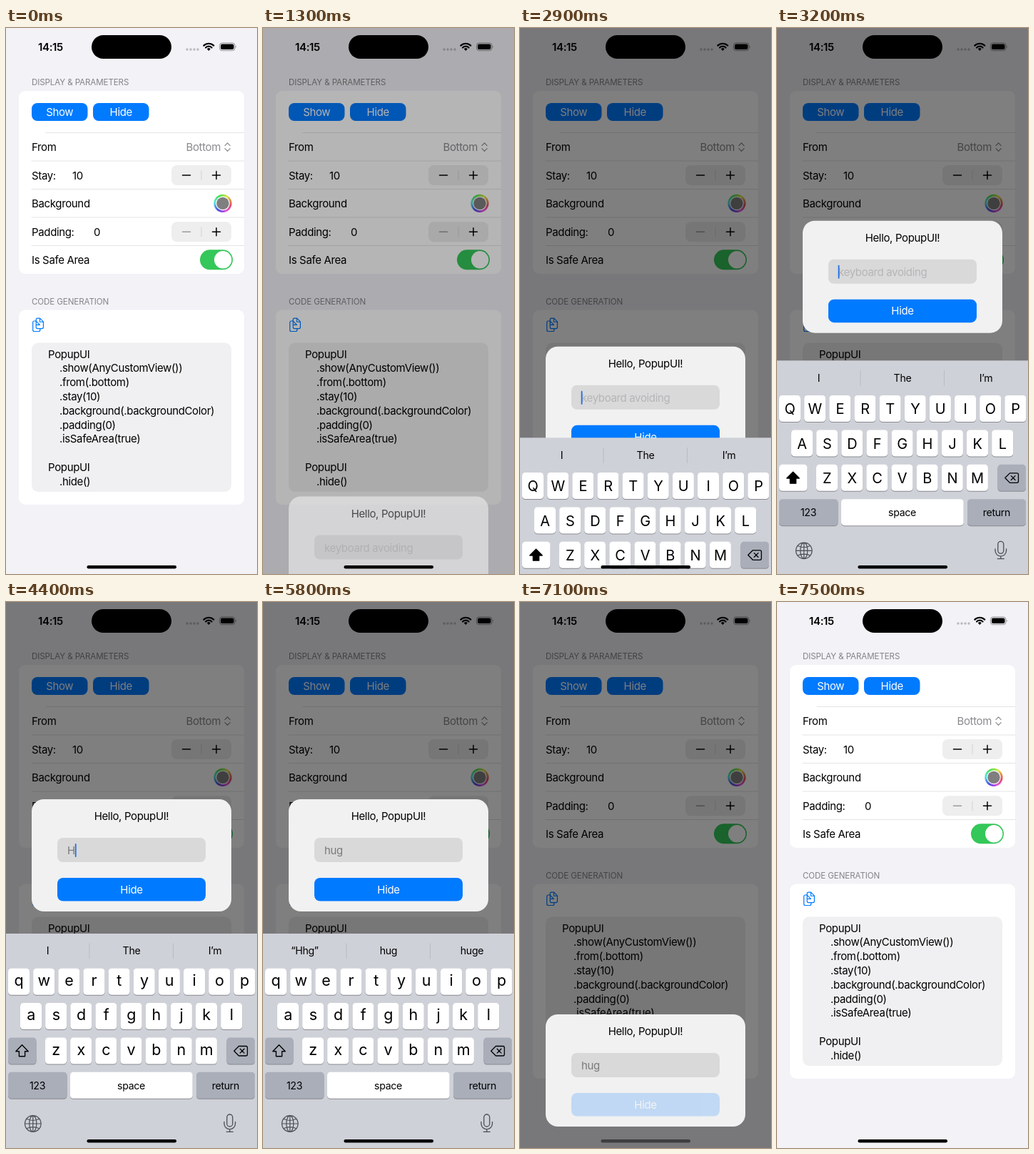
Write an HTML page that moves like this. It is 352 px wide and 764 px high and loops after 7.9 s.

```html
<!DOCTYPE html>
<html lang="en">
<head>
<meta charset="utf-8">
<title>Popup demo</title>
<style>
html, body { margin: 0; width: 100%; height: 100%; overflow: hidden; background: #f2f2f7; }
svg { display: block; width: 352px; height: 764px; }
text { font-family: Inter, "Liberation Sans", sans-serif; letter-spacing: -.35px; white-space: pre; }
.caps { letter-spacing: -.12px; }
.line { fill: none; stroke-linecap: round; stroke-linejoin: round; }
</style>
</head>
<body>
<svg id="stage" viewBox="0 0 352 764" xmlns="http://www.w3.org/2000/svg">
  <g id="page"></g>
  <rect id="dim" width="352" height="764"/>
  <g id="popup"></g>
  <g id="keyboard"></g>
  <rect id="home" x="113.5" y="752" width="125.5" height="4.5" rx="2.25"/>
</svg>
<script>
const LOOP = 7900, STEP = 100;
const BLUE = '#007aff', GRAY = '#8a8a8e';
const $ = id => document.getElementById(id);

function add(parent, tag, attrs, content) {
  const el = document.createElementNS('http://www.w3.org/2000/svg', tag);
  for (const key in attrs) el.setAttribute(key, attrs[key]);
  if (content !== undefined) el.textContent = content;
  parent.appendChild(el);
  return el;
}
const box = (p, x, y, width, height, rx, fill) =>
  add(p, 'rect', { x, y, width, height, rx, fill });
const disc = (p, cx, cy, r, fill) => add(p, 'circle', { cx, cy, r, fill });
const line = (p, d, stroke, width) =>
  add(p, 'path', { d, stroke, 'stroke-width': width, class: 'line' });
// Text whose capitals are vertically centred on y.
const label = (p, str, x, y, { fill = '#000', size = 15, anchor = 'start', ...rest } = {}) =>
  add(p, 'text', { x, y: y + size * .364, fill, 'font-size': size, 'text-anchor': anchor, ...rest }, str);
const centred = (p, str, x, y, opts) => label(p, str, x, y, { anchor: 'middle', ...opts });

function button(p, str, x, y, w, h) {
  const g = add(p, 'g', {});
  box(g, x, y, w, h, 8, BLUE);
  centred(g, str, x + w / 2, y + h / 2, { fill: '#fff' });
  return g;
}

function statusBar(p) {
  label(p, '14:15', 45, 26.5, { 'font-weight': 600 });
  box(p, 120, 10, 112, 33, 16.5, '#000');
  for (let i = 0; i < 4; i++) disc(p, 254 + i * 5, 30, 1.7, '#b9b9be');
  line(p, 'M277.3 24.6A10 10 0 0 1 291.3 24.6', '#000', 2.2);
  line(p, 'M280 27.4A6.2 6.2 0 0 1 288.6 27.4', '#000', 2.1);
  add(p, 'path', { d: 'M281.8 29.3A3.6 3.6 0 0 1 286.8 29.3L284.3 32Z' });
  add(p, 'rect', { x: 299.5, y: 21, width: 21.5, height: 10.6, rx: 3.4, fill: 'none', stroke: '#8d8d91' });
  box(p, 301, 22.5, 18.5, 7.6, 2.1, '#000');
  add(p, 'path', { d: 'M322 24.5Q323.8 26.3 322 28.1Z', fill: '#8d8d91' });
}

function stepper(p, y, minus) {
  box(p, 232, y - 14, 84, 28, 7.5, '#eeeeef');
  line(p, `M247.5 ${y}h11`, minus, 1.5);
  line(p, `M274 ${y - 6.5}v13`, '#d3d3d6', 1);
  line(p, `M289.5 ${y}h11M295 ${y - 5.5}v11`, '#000', 1.5);
}

function colorWell(p, cx, cy) {
  const segments = 36, r = 11.2;
  const at = a => `${cx + r * Math.sin(a)} ${cy - r * Math.cos(a)}`;
  for (let i = 0; i < segments; i++) {
    const a = i / segments * 2 * Math.PI;
    add(p, 'path', {
      d: `M${at(a)}A${r} ${r} 0 0 1 ${at(a + .19)}`, fill: 'none',
      stroke: `hsl(${90 - i * 360 / segments} 72% 58%)`, 'stroke-width': 2.8
    });
  }
  disc(p, cx, cy, 8.7, '#7f7f7f');
}

function buildPage(p) {
  box(p, 0, 0, 352, 764, 0, '#f2f2f7');
  statusBar(p);

  const caps = { fill: '#858589', size: 11.6, class: 'caps' };
  label(p, 'DISPLAY & PARAMETERS', 36, 75.3, caps);
  box(p, 18, 88, 316, 256, 9, '#fff');
  button(p, 'Show', 36, 105, 78.5, 25);
  button(p, 'Hide', 122, 105, 78.5, 25);
  line(p, 'M56 146.5H334', '#dddde0', .8);
  for (let i = 1; i < 5; i++) line(p, `M36 ${146.5 + i * 39.5}H334`, '#dddde0', .8);

  label(p, 'From', 36, 167);
  label(p, 'Bottom', 301, 167, { fill: GRAY, anchor: 'end' });
  line(p, 'M307 164.6l3.6-3.8 3.6 3.8M307 168.6l3.6 3.8 3.6-3.8', GRAY, 1.2);
  label(p, 'Stay:', 36, 206.3);
  label(p, '10', 93, 206.3);
  stepper(p, 206, '#000');
  label(p, 'Background', 36, 245.8);
  colorWell(p, 304, 245.4);
  label(p, 'Padding:', 36, 285.3);
  label(p, '0', 123, 285.3);
  stepper(p, 285.3, '#9b9ba0');
  label(p, 'Is Safe Area', 36, 324.8);
  box(p, 272, 310.3, 46, 28, 14, '#34c759');
  disc(p, 304.2, 324.3, 12.2, '#fff');

  label(p, 'CODE GENERATION', 36, 382.3, caps);
  box(p, 18, 394.5, 316, 272.5, 9, '#fff');
  line(p, 'M42 410H39.5Q37.7 410 37.7 412V422.5Q37.7 424.5 39.5 424.5H46Q47.8 424.5 47.8 422.5V420.8', BLUE, 1.2);
  line(p, 'M42.2 408.2Q42.2 406.2 44 406.2H47.6L52.4 411.2V418.6Q52.4 420.6 50.6 420.6H44Q42.2 420.6 42.2 418.6Z', BLUE, 1.2);
  line(p, 'M47.4 406.5V411.3H52.2M42 410L47.5 415.4H42.6', BLUE, 1.1);
  box(p, 36, 440.5, 280, 208.5, 9, '#f0f0f2');
  ['PopupUI', '.show(AnyCustomView())', '.from(.bottom)', '.stay(10)',
    '.background(.backgroundColor)', '.padding(0)', '.isSafeArea(true)', '',
    'PopupUI', '.hide()'
  ].forEach((code, i) => label(p, code, code[0] === '.' ? 75 : 59, 456.2 + i * 19.8));
}

function buildPopup(p) {
  box(p, 36, 0, 280, 157, 17, '#f1f1f2');
  centred(p, 'Hello, PopupUI!', 176, 24);
  box(p, 72, 54, 208, 34, 7.5, '#d9d9da');
  return {
    field: label(p, '', 86, 71.7),
    caret: box(p, 85.7, 62, 1.8, 19, .9, '#1f6fe5'),
    hide: button(p, 'Hide', 72, 110, 208, 32.5)
  };
}

function key(p, x, y, w, fill = '#fff') {
  box(p, x, y + 1, w, 37, 4.5, '#898b90');
  return box(p, x, y, w, 37, 4.5, fill);
}

function buildKeyboard(p) {
  const dark = '#a9aeb9', ink = '#4c4e55';
  box(p, 0, 464, 352, 300, 0, '#cfd1d8');
  line(p, 'M117 478V499M234.5 478V499', '#b7b9c0', .9);
  const words = [58.5, 176, 293].map(x => centred(p, '', x, 488.3, { size: 14.2 }));
  const letters = [];
  [['QWERTYUIOP', 3], ['ASDFGHJKL', 20], ['ZXCVBNM', 55]].forEach(([row, x0], r) => {
    [...row].forEach((char, i) => {
      const x = x0 + i * 35.15, y = 512.7 + r * 48.4;
      key(p, x, y, 30);
      const el = centred(p, char, x + 15, y + 19, { size: 20, 'letter-spacing': 0 });
      letters.push({ el, char, y: y + 26.3 });
    });
  });
  const shiftKey = key(p, 3, 609.5, 39.5);
  const arrow = line(p, 'M22.5 619.8L31.2 628.7H26.6V635.8H18.4V628.7H13.8Z', '#000', 1.4);
  key(p, 309.5, 609.5, 39.5, dark);
  line(p, 'M326.5 621.5H336.5Q338.5 621.5 338.5 623.5V633Q338.5 635 336.5 635H326.5L319.8 628.2ZM328.3 625.3l5.8 5.8M334.1 625.3l-5.8 5.8', '#000', 1.3);
  key(p, 3, 657.8, 82.5, dark);
  key(p, 90, 657.8, 171.7);
  key(p, 267, 657.8, 82, dark);
  [['123', 44], ['space', 175.5], ['return', 308]].forEach(([s, x]) =>
    centred(p, s, x, 676.8, { size: 14.2 }));
  line(p, 'M26.5 730a11.3 11.3 0 1 0 22.6 0a11.3 11.3 0 1 0-22.6 0M32.8 730a5 11.3 0 1 0 10 0a5 11.3 0 1 0-10 0M37.8 718.7V741.3M26.5 730H49.1M29 723.2Q37.8 727.4 46.6 723.2M29 736.8Q37.8 732.6 46.6 736.8', ink, 1.2);
  line(p, 'M309.8 721a4 4 0 0 1 8 0V730a4 4 0 0 1-8 0ZM306 727.5V730a7.8 7.8 0 0 0 15.6 0V727.5M313.8 738V741.3M309.3 741.3H318.3', ink, 1.3);

  return (upper, suggestions) => {
    words.forEach((el, i) => { el.textContent = suggestions[i]; });
    for (const { el, char, y } of letters) {
      el.textContent = upper ? char : char.toLowerCase();
      el.setAttribute('font-size', upper ? 20 : 21.5);
      el.setAttribute('y', upper ? y : y - 2);
    }
    shiftKey.setAttribute('fill', upper ? '#fff' : dark);
    arrow.style.fill = upper ? '#000' : 'none';
  };
}

buildPage($('page'));
const popup = buildPopup($('popup'));
const setKeys = buildKeyboard($('keyboard'));

const clamp = v => Math.min(1, Math.max(0, v));
// Damped spring: response 0.4 s, damping fraction 0.65.
function spring(ms) {
  const s = Math.max(0, ms) / 1000, w = 11.93 * s;
  return 1 - Math.exp(-10.2 * s) * (Math.cos(w) + .855 * Math.sin(w));
}
// Critically damped slide of the keyboard.
function slide(ms) {
  const x = Math.max(0, ms) * .018;
  return 1 - (1 + x) * Math.exp(-x);
}
// Last value whose start time has been reached.
const latest = (t, steps) => steps.filter(([start]) => t >= start).pop()[1];
const blink = (t, start) => 1 - clamp((t - start + 100) / 200) + clamp((t - start - 100) / 200);

function draw(t) {
  const shown = t < 7500 ? spring(t - 1200) - spring(t - 7100) : 0;
  const lift = spring(t - 2820) - spring(t - 5820);
  const keys = slide(t - 2780) - slide(t - 5820);

  $('dim').setAttribute('opacity', .5 * clamp(shown));
  $('popup').setAttribute('transform', `translate(0 ${764 - 187 * shown - 301 * lift})`);
  $('popup').setAttribute('opacity', clamp(shown));
  $('keyboard').setAttribute('transform', `translate(0 ${300 * (1 - keys)})`);
  $('keyboard').style.display = keys > .003 ? '' : 'none';
  $('home').setAttribute('fill', shown > .9 && keys < .15 ? '#3e3e40' : '#000');

  const typed = latest(t, [[0, ''], [4400, 'H'], [4700, 'Hh'], [5000, 'Hhg'], [5800, 'hug']]);
  popup.field.textContent = typed || 'keyboard avoiding';
  popup.field.setAttribute('fill', typed ? '#7a7a7b' : '#b5b5b7');
  const focused = t >= 2800 && t < 5800;
  const caretX = typed ? 86 + popup.field.getComputedTextLength() : 85.7;
  popup.caret.setAttribute('x', caretX);
  popup.caret.setAttribute('opacity', focused ? blink(t, t < 4300 ? 3700 : 5300) : 0);
  popup.hide.setAttribute('opacity', t >= 7100 ? .2 + .8 * clamp((t - 7100) / 200) : 1);

  setKeys(t < 4400, t < 5100 ? ['I', 'The', 'I’m'] : ['“Hhg”', 'hug', 'huge']);
}

const begin = performance.now();
function tick() {
  const elapsed = Math.max(0, performance.now() - begin);
  draw(Math.floor(elapsed / STEP) * STEP % LOOP);
  requestAnimationFrame(tick);
}
tick();
</script>
</body>
</html>
```
